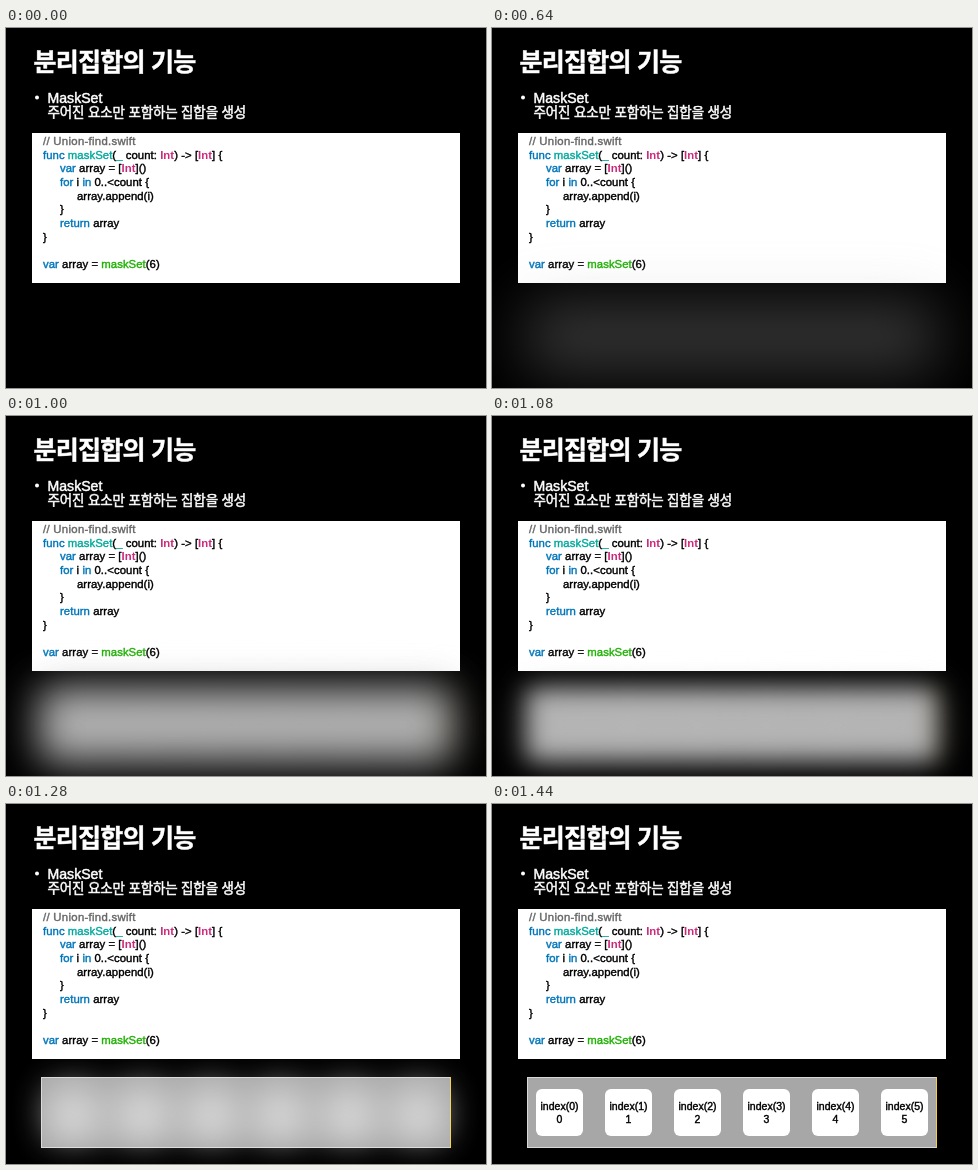
Recreate the animation shown at these times as an HTML page. Size 480 px wide and 360 px high, loop 1960 ms.

```html
<!DOCTYPE html>
<html lang="ko">
<head>
<meta charset="utf-8">
<style>
  html, body { margin: 0; width: 100%; height: 100%; overflow: hidden; background: #000; }
  svg { display: block; }
  text { font-family: "Liberation Sans", Arial, sans-serif; white-space: pre; stroke-width: .4px; }
  .ko { font-family: "Noto Sans CJK KR", "Noto Sans CJK", sans-serif; }
  .heading { fill: #fff; }
  .heading text { stroke: #fff; stroke-width: .5px; }
  #code text { font-size: 11.35px; letter-spacing: .05px; fill: #000; stroke: #000; }
  #code .comment { fill: #666; stroke: #666; letter-spacing: .3px; }
  .key { fill: #0076ba; stroke: #0076ba; }
  .decl { fill: #00a89d; stroke: #00a89d; }
  .type { fill: #cb297b; stroke: none; font-weight: 700; }
  .call { fill: #1db100; stroke: #1db100; }
  #cards text { font-size: 10.5px; text-anchor: middle; stroke: #000; }
</style>
</head>
<body>
<svg width="480" height="360" viewBox="0 0 480 360">
  <rect width="480" height="360"/>
  <g class="heading">
    <text class="ko" x="27.5" y="43.3" font-size="25" font-weight="700" letter-spacing="-.75">분리집합의 기능</text>
    <circle cx="31" cy="69.5" r="2"/>
    <text x="41.5" y="74.8" font-size="14.1">MaskSet</text>
    <text class="ko" x="41.5" y="89" font-size="13.5" letter-spacing="-.15">주어진 요소만 포함하는 집합을 생성</text>
  </g>
  <rect x="26" y="105" width="428" height="150" fill="#fff"/>
  <g id="code"></g>
  <g id="panel">
    <rect x="35.5" y="273.5" width="409" height="70" fill="#a7a7a7" stroke="#d8d8d8"/>
    <path d="M444.5 273V344" stroke="#f7d038"/>
  </g>
  <g id="cards"></g>
</svg>
<script>
const LOOP = 1960, TICK = 40, START = 560, MAX_BLUR = 30;
const byId = id => document.getElementById(id);
const progress = (t, from, to) => Math.min(1, Math.max(0, (t - from) / (to - from)));
const mark = (cls, text) => `<tspan class="${cls}">${text}</tspan>`;
const int = mark('type', 'Int');

// [indent level, markup]
const lines = [
  [0, mark('comment', '// Union-find.swift')],
  [0, `${mark('key', 'func')} ${mark('decl', 'maskSet')}(${mark('decl', '_')} count: ${int}) -&gt; [${int}] {`],
  [1, `${mark('key', 'var')} array = [${int}]()`],
  [1, `${mark('key', 'for')} i ${mark('key', 'in')} 0..&lt;count {`],
  [2, 'array.append(i)'],
  [1, '}'],
  [1, `${mark('key', 'return')} array`],
  [0, '}'],
  [0, ''],
  [0, `${mark('key', 'var')} array = ${mark('call', 'maskSet')}(6)`]
];
byId('code').innerHTML = lines.map(([indent, text], row) =>
  `<text x="${37 + indent * 17}" y="${117 + row * 13.65}">${text}</text>`).join('');

byId('cards').innerHTML = [0, 1, 2, 3, 4, 5].map(i => {
  const x = 44 + i * 69;
  return `<rect x="${x}" y="285" width="47" height="47" rx="6" fill="#fff"/>
    <text x="${x + 23.5}" y="305.5">index(${i})</text>
    <text x="${x + 23.5}" y="318.5">${i}</text>`;
}).join('');

// Fades in while the blur eases from its maximum to zero.
function blurIn(id, t, [fadeFrom, fadeTo], [blurFrom, blurTo]) {
  const style = byId(id).style;
  const sigma = MAX_BLUR * (1 - progress(t, blurFrom, blurTo) ** 3);
  style.opacity = t < START ? 0 : progress(t, fadeFrom, fadeTo);
  style.filter = sigma ? `blur(${sigma}px)` : 'none';
}

function draw(now) {
  const t = Math.floor(now % LOOP / TICK) * TICK;
  blurIn('panel', t, [490, 960], [560, 1180]);
  blurIn('cards', t, [820, 1360], [820, 1440]);
  requestAnimationFrame(draw);
}
draw(performance.now());
</script>
</body>
</html>
```
